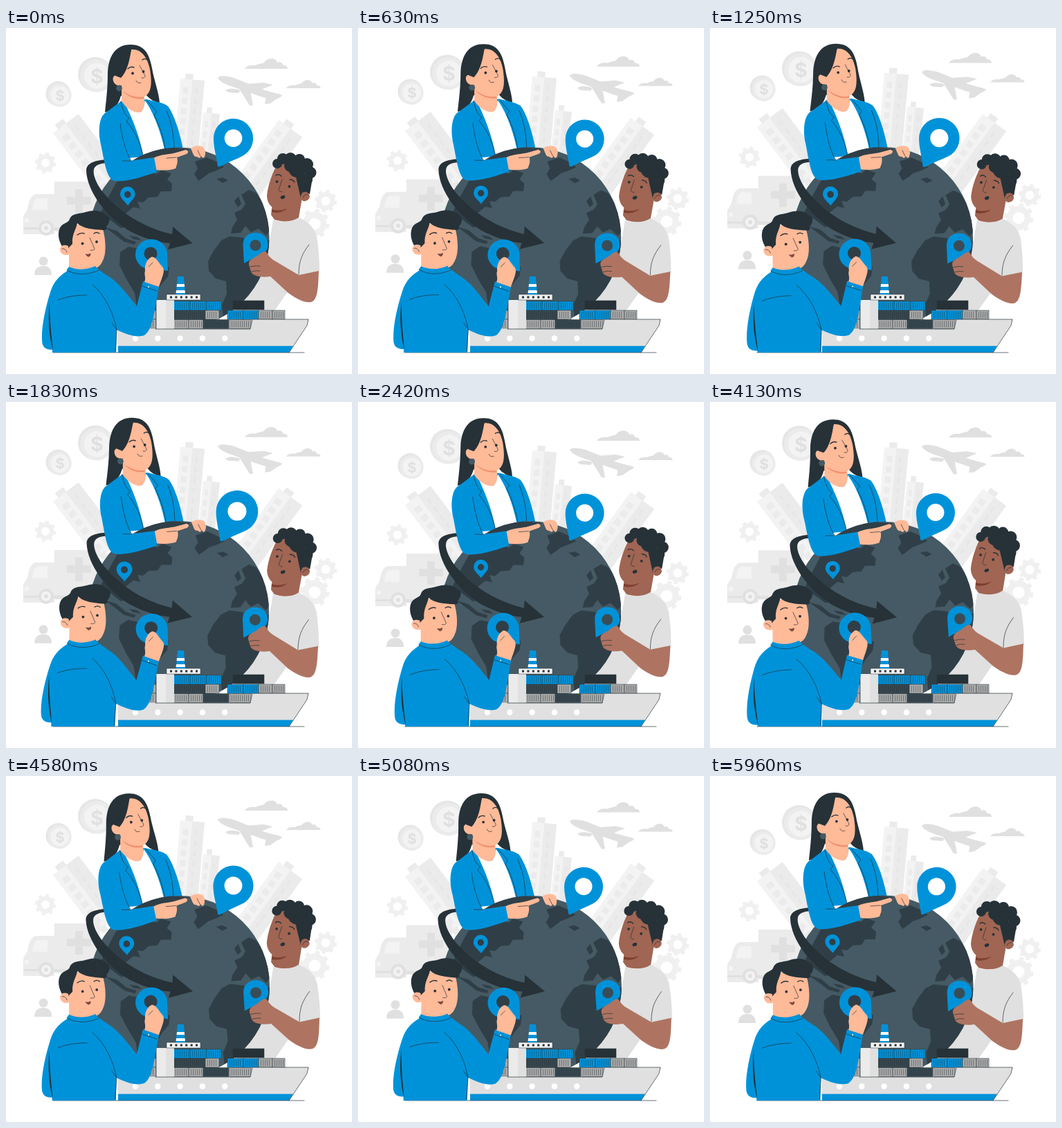
Animation, 500 px wide and 500 px high, one loop 6000 ms. Source, as an HTML page:

```html
<!DOCTYPE html>
<html lang="en">
<head>
<meta charset="utf-8">
<title>Global logistics</title>
<style>
  html, body { margin: 0; width: 100%; height: 100%; overflow: hidden; background: #fff; }
  svg { display: block; width: 100vw; height: 100vh; }
  .blue { fill: #0092d9; }
  .dark { fill: #263238; }
  .land { fill: #303f47; }
  .peach { fill: #ffba98; }
  .brown { fill: #a06553; }
  .tan { fill: #ae7461; }
  .grey { fill: #e0e0e0; }
  .soft { fill: #e6e6e6; }
  .pale { fill: #ebebeb; }
  .mist { fill: #f3f3f3; }
  .ink { fill: none; stroke: #263238; stroke-width: .7; stroke-linecap: round; stroke-linejoin: round; }
  .brow { fill: none; stroke: #263238; stroke-width: 1.4; stroke-linecap: round; }
  .coin { font: bold 30px Inter, sans-serif; text-anchor: middle; fill: #e0e0e0; }
</style>
</head>
<body>
<svg id="stage" viewBox="0 0 500 500"></svg>
<script>
const LOOP = 6000, FPS = 24, TAU = Math.PI * 2;

const path = (cls, d) => `<path class="${cls}" d="${d}"/>`;
const rect = (cls, x, y, w, h) => `<rect class="${cls}" x="${x}" y="${y}" width="${w}" height="${h}"/>`;
const dot = (cls, x, y, r) => `<circle class="${cls}" cx="${x}" cy="${y}" r="${r}"/>`;
const oval = (cls, x, y, rx, ry, turn = 0) =>
  `<ellipse class="${cls}" rx="${rx}" ry="${ry}" transform="translate(${x} ${y}) rotate(${turn})"/>`;
const group = (id, body) => `<g id="${id}">${body}</g>`;
const range = n => [...Array(n).keys()];

// ---- background ----
function coin(x, y, r) {
  return dot('soft', x - 2, y - 2, r) + dot('pale', x, y, r * .95) + dot('mist', x + .5, y, r * .74) +
    `<text class="coin" x="${x + .5}" y="${y + r * .42}" style="font-size:${r * 1.15}px">$</text>`;
}

function gear(x, y, r) {
  const tooth = TAU * r * .9 / 16;
  return `<g fill="none" stroke="#f0f0f0"><circle cx="${x}" cy="${y}" r="${r * .62}" stroke-width="${r * .42}"/>
    <circle cx="${x}" cy="${y}" r="${r * .9}" stroke-width="${r * .24}" stroke-dasharray="${tooth * .9} ${tooth * 1.1}"/></g>`;
}

function tower(x, y, w, h, turn) {
  const rows = range(Math.floor(h / 15)).map(i =>
    rect('soft', w * .66, 12 + i * 15, 3, 8) + rect('pale', w * .14, 12 + i * 15, w * .22, 9)).join('');
  return `<g transform="translate(${x} ${y}) rotate(${turn})">` +
    rect('pale', w * .2, -8, w * .32, 9) + rect('mist', 0, 0, w, h) + rect('pale', w * .5, 0, w * .5, h) +
    rows + '</g>';
}

const cloud = (x, y, s) => `<g transform="translate(${x} ${y}) scale(${s})">` +
  path('grey', 'M0 15 C3 10 9 9 16 10 C20 7 25 8 28 6 C32 -1 45 -2 47 6 C52 4 55 7 55 10 C60 10 62 12 62 15 Z') + '</g>';

const plane =
  path('grey', 'M345 81 L372 79 L386 82 L366 90 Z') +
  path('grey', 'M306 72 C309 68 318 69 329 72 L369 88 C381 93 393 94 399 97 C398 102 384 105 368 99 L322 83 C314 80 308 76 306 72 Z') +
  path('grey', 'M336 86 L353 91 L357 112 L352 112 Z') +
  path('grey', 'M317 90 C323 86 333 88 339 90 L336 94 L321 93 Z') +
  path('grey', 'M376 97 L399 97 L382 109 L374 110 Z');

const truck =
  rect('pale', 70, 222, 66, 68) +
  rect('grey', 100, 233, 11, 34) + rect('grey', 88, 244, 35, 11) +
  path('pale', 'M70 240 L45 240 C36 240 33 251 31 262 L25 272 V298 H70 Z') +
  path('mist', 'M60 246 H46 C41 246 39 254 38 263 H60 Z') +
  rect('grey', 25, 288, 45, 3) + rect('grey', 70, 288, 60, 5) + rect('mist', 27, 275, 6, 6) +
  dot('grey', 58, 289, 11) + dot('mist', 58, 289, 7) + dot('grey', 58, 289, 3);

const scenery =
  coin(131, 69, 25) + coin(77.5, 97, 18) +
  tower(252, 73, 35, 112, 5) + tower(285, 122, 24, 70, 6) +
  tower(68, 152, 46, 105, -37) + tower(394, 133, 42, 115, 36) +
  cloud(345, 44, 1) + cloud(405, 75, .8) + plane + truck +
  gear(57, 195, 15) + gear(446, 283, 21) + gear(462, 250, 16) +
  dot('grey', 54, 337, 6.5) + path('grey', 'M41 357 C41 348 46 344 54 344 C62 344 66 348 66 357 Z');

// ---- globe ----
const globe =
  `<clipPath id="disc"><circle cx="250" cy="303" r="130.5"/></clipPath>
  <circle cx="250" cy="303" r="130.5" fill="#455a64"/><g clip-path="url(#disc)">` +
  path('land', 'M186 190 L205 178 L232 172 L264 175 L262 180 L248 184 L246 190 L235 187 L222 192 L212 188 L196 192 Z') +
  path('land', 'M148 244 L160 222 L178 213 L195 215 L203 207 L218 211 L225 205 L239 210 L233 219 L240 225 L239 236 L224 236 L219 244 L206 245 L198 252 L190 251 L194 261 L184 259 L172 269 L164 278 L176 287 L166 289 L150 277 L133 275 Z') +
  path('land', 'M205 193 L222 190 L224 198 L216 204 L204 202 Z M227 196 L243 192 L248 200 L238 204 Z') +
  path('land', 'M273 193 L290 187 L306 194 L315 201 L304 206 L293 210 L284 217 L278 221 L272 211 L277 203 Z') +
  path('land', 'M304 218 L313 216 L321 220 L313 224 Z') +
  path('land', 'M143 288 L160 293 L173 304 L188 309 L186 313 L171 309 L158 299 Z M178 300 L190 302 L196 307 L184 305 Z') +
  path('land', 'M165 324 L177 316 L192 319 L208 327 L219 337 L236 346 L234 359 L224 371 L214 388 L203 402 L200 418 L190 410 L186 383 L174 363 L164 343 Z') +
  path('land', 'M330 250 L336 243 L340 254 L335 259 Z M327 288 L334 277 L330 267 L341 262 L346 254 L340 241 L351 234 L361 238 L372 252 L385 288 L376 300 L365 290 L354 295 L346 286 L339 296 L325 297 Z') +
  path('land', 'M311 307 L323 301 L342 303 L354 310 L382 306 L380 345 L360 388 L340 409 L314 419 L312 400 L319 384 L318 366 L303 362 L293 351 L292 337 L300 322 Z') +
  '</g>';

const arrow = path('dark',
  'M147 190 C131 191 116 194 116 206 C117 236 145 273 178 293 C201 305 221 310 237 311 L234 320 L269.5 311 L241 287 L240 298 C204 290 169 270 146 244 C132 229 125 213 127 204 C129 197 139 195 148 195 Z');

const pins =
  path('blue', 'M305 200 C303 185 299 174 299 160 A28 28 0 1 1 340 185 C330 190 319 194 308 200 Z') +
  `<circle cx="327" cy="160" r="12.5" fill="#fff"/>` +
  path('blue', 'M178 255 C173 249 167 245 167 239 A10.5 10.5 0 0 1 188 239 C188 245 182 249 178 255 Z') +
  dot('land', 177.5, 239.5, 4.7);

// ---- people ----
const womanBack =
  path('dark', 'M180 24 C157 24 148 42 147 65 C147 91 144 110 143 122 C156 119 163 110 166 98 L202 96 C208 104 216 107 222 108 C221 93 214 76 211 58 C207 36 199 24 180 24 Z') +
  path('blue', 'M166 106 L142 124 L150 190 L200 186 L256 175 C251 150 243 125 234 113 C226 107 214 106 203 103 Z') +
  `<path fill="#fff" d="M171 107 L196 121 L201 105 C212 120 224 149 230 180 L199 188 C193 153 180 126 171 107 Z"/>` +
  path('peach', 'M167 80 V106 C175 118 187 123 194 122 C200 118 201 110 200 104 L200 92 Z') +
  `<path fill="#f28f6e" d="M169 91 C178 98 188 101 199 99 L199 102 C186 104 174 98 169 91 Z"/>` +
  path('peach', 'M181 31 C196 30 205 42 208 60 C211 78 211 94 200 99 C186 103 171 94 167 83 C158 85 153 77 155 71 C158 66 164 69 166 72 C174 64 178 51 181 31 Z') +
  path('dark', 'M182 29 C178 39 177 58 166 72 L158 69 C158 49 164 34 182 29 Z M181 29 C190 29 203 38 207 55 L210 55 C204 33 194 26 181 29 Z') +
  `<circle cx="163.5" cy="87" r="4.4" fill="#455a64"/>` +
  dot('dark', 183, 65.5, 1.9) + dot('dark', 198.5, 63, 1.9) +
  path('brow', 'M176 59 Q180 55 185 57 M197 46 Q201 43 204 46') +
  path('ink', 'M193 54 L201 69 Q201 73 196 72 M188 76 Q190 81 195 79') +
  path('ink', 'M166 106 C169 120 172 126 178 130 L174 135 C186 148 193 164 198 184 M204 105 L218 121 L214 126 C223 142 228 160 231 178 M232 120 C239 136 242 151 243 173');

const womanArms =
  path('peach', 'M213 188 C224 182 236 183 246 180 L260 176 Q266 178 261 182 L247 187 C249 192 247 199 245 203 C237 206 226 206 216 205 Z') +
  path('blue', 'M143 123 C134 130 133 151 137 168 C142 191 145 219 157 221 C175 223 200 214 218 208 L214 187 L180 192 C176 179 173 162 168 139 Z') +
  path('ink', 'M165 138 C168 160 173 180 181 192 M168 192 L181 192 M232 188 L246 187') +
  path('peach', 'M267 174 C271 170 280 169 285 172 Q290 178 287 186 Q285 190 282 185 Q280 190 276 186 Q272 187 270 181 Z') +
  path('ink', 'M277 177 L281 185');

const rightBody =
  path('grey', 'M386 277 C400 282 414 279 423 274 C437 280 446 289 449 301 C452 320 453 335 453 352 L424 357 L375 427 H330 L340 367 L378 326 Z');

const rightMan =
  path('brown', 'M385 253 L383 270 L388 277 C401 281 414 280 423 274 L428 245 Z') +
  `<path fill="#7d3f30" d="M384 262 C394 265 401 263 407 260 C402 266 392 268 384 266 Z"/>` +
  path('brown', 'M394 194 C385 207 378 229 377 243 C378 258 389 265 402 262 C415 259 424 252 428 246 Q436 253 439 244 Q438 235 429 235 L425 205 Z') +
  [[392, 196, 7], [400, 189, 8], [411, 189, 9], [424, 190, 8], [435, 197, 9], [440, 209, 8.5], [434, 219, 9], [421, 203, 13], [411, 199, 9], [433, 231, 7]]
    .map(c => dot('dark', ...c)).join('') +
  path('dark', 'M418 211 L443 216 L439 240 Q433 236 428 238 L426 246 Z') +
  oval('brown', 432, 243.5, 6, 7, 25) + path('ink', 'M429 245 Q432 239 436 241') +
  dot('dark', 391.5, 222, 1.9) + dot('dark', 409.5, 229, 1.9) +
  path('brow', 'M390 213 Q394 210 398 214 M410 219 Q415 219 417 223') +
  path('ink', 'M399 219 L394 234 Q395 237 399 237') +
  oval('dark', 400, 244.5, 3.4, 2.4, -22) +
  path('blue', 'M344 340 L342.5 313 C342.5 290 378.5 290 378.5 313 C379 325 365 331 355 334 Z') +
  `<circle cx="360.5" cy="314" r="8" fill="#3a4d56"/>` +
  path('tan', 'M351 342 C350 335 357 333 362 330 C368 325 374 320 377 325 C379 329 382 332 386 335 L423 357 L452 351 C451 374 451 393 441 396 C432 398 419 391 408 383 L382 359 C371 361 356 359 354 352 Z') +
  path('ink', 'M438 313 C428 326 423 337 423 356 M353 345 Q360 343 367 344 M355 352 Q361 350 367 351');

const leftMan =
  path('blue', 'M234 351 C223 349 206 349 198 346 A23 22 0 1 1 233 326 Z') +
  dot('land', 209, 326, 9.5) +
  path('blue', 'M90 350 C79 357 69 365 64 382 C57 404 51 432 52 451 C52 461 57 465 67 465 V474 H159 L160 436 C174 443 189 448 200 444 C210 437 213 419 216 402 L221 374 L198 366 L189 402 C175 385 163 367 145 357 L131 347 Z') +
  path('dark', 'M63 397 C60 423 63 449 68 466 C66 449 63 423 63 397 Z') +
  path('peach', 'M91 321 L91 350 C101 356 118 354 130 347 L120 338 Z') +
  path('peach', 'M97 286 C110 281 130 284 140 290 C144 306 146 326 139 338 C133 351 118 350 108 344 C100 340 96 334 92 327 Q81 331 78 321 Q79 313 89 314 Z') +
  path('dark', 'M82 317 C75 307 74 294 79 287 C84 281 90 282 92 276 C96 267 106 269 115 266 C127 262 139 264 144 270 C151 272 151 281 145 287 C147 290 144 293 140 292 C126 291 111 290 103 282 C101 292 95 298 96 312 L90 318 Z') +
  path('peach', 'M90 315 Q81 311 78 319 Q79 329 90 328 Z') +
  path('ink', 'M81 319 Q86 318 88 324') +
  dot('dark', 110.5, 311.5, 1.9) + dot('dark', 131, 309, 1.9) +
  path('brow', 'M103 299 Q108 295 113 297 M127 297 Q131 294 135 297') +
  path('ink', 'M121 303 L128 319 Q127 322 122 321') +
  `<path fill="#9f4538" stroke="#263238" stroke-width=".6" d="M115 327 Q119 328 122 326 Q122 331 118 330 Z"/>` +
  path('blue', 'M88 349 L91 345 C102 350 116 350 129 344 L134 350 C120 357 102 359 90 355 Z') +
  path('ink', 'M88 350 C102 358 119 357 134 350 M75 393 C91 387 105 386 117 386 M125 371 C143 386 155 411 160 436 L158 467 M197 373 L218 380 M160 436 L153 426') +
  path('peach', 'M201 351 C200 342 204 334 210 331 C216 329 220 339 226 345 C231 350 225 362 221 374 L200 367 C203 361 199 356 201 351 Z') +
  path('ink', 'M206 345 L212 339') +
  `<circle cx="206" cy="374" r="1" fill="#fff"/>`;

// ---- ship ----
const paint = { b: '#0092d9', d: '#37474f', k: '#263238', g: '#a9a9a9' };

function box(x, y, w, tone) {
  return `<rect x="${x}" y="${y}" width="${w}" height="13" fill="${paint[tone]}" stroke="#263238" stroke-width=".5"/>
    <path d="M${x + 3} ${y + 6.5}H${x + w - 2}" stroke="#263238" stroke-opacity=".5" stroke-width="9" stroke-dasharray=".9 2.1"/>`;
}

const cargo = [
  [203, 408, 14, 'g'], [203, 421, 14, 'g'],
  [242, 395, 24, 'b'], [266, 395, 24, 'b'], [290, 395, 21, 'b'],
  [242, 408, 46, 'd'], [288, 408, 20, 'g'],
  [242, 421.5, 22, 'g'], [264, 421.5, 21, 'g'], [285, 421.5, 37, 'd'],
  [328, 394, 45, 'k'], [320, 408, 23, 'b'], [343, 408, 22, 'b'],
  [365, 408, 20, 'g'], [385, 408, 18, 'g'], [323, 421.5, 31, 'g']
];

const ship =
  cargo.map(c => box(...c)).join('') +
  rect('pale', 217, 393, 26, 43) + rect('grey', 231, 393, 12, 43) + path('ink', 'M217 393 V435') +
  path('grey', 'M161 435 H353 L356 421 H437 L435 430 L414 461 H162 Z') +
  path('blue', 'M162 459.5 H415 L409 469 H162 Z') +
  path('ink', 'M216 435 H353 L356 421 H437 L435 430 L409 469') +
  range(5).map(i => `<circle cx="${187 + i * 32.3}" cy="448.5" r="4.2" fill="#fff"/>`).join('') +
  `<rect x="232" y="385" width="49" height="8" fill="#f1f1f1" stroke="#263238" stroke-width=".5"/>
  <path d="M237 389H278" stroke="#263238" stroke-width="3" stroke-dasharray="3 4.4"/>` +
  path('blue', 'M248 359 H257 L259 385 H245.5 Z') +
  `<path fill="#fff" d="M247 370 H257.8 L258.2 374 H246.6 Z M246 379 H258.6 L258.9 383 H245.6 Z"/>` +
  path('ink', 'M68 469 H431');

document.getElementById('stage').innerHTML =
  group('scenery', scenery) +
  group('world', womanBack + rightBody + globe + arrow + group('pins', pins) + womanArms + rightMan) +
  ship +
  `<clipPath id="floor"><rect width="500" height="469"/></clipPath>
  <g clip-path="url(#floor)">${group('worker', leftMan)}</g>`;

// ---- motion ----
const beats = [[0, .22], [.14, 1], [.18, .93], [.32, 0], [.75, 0], [.85, .55], [.96, 0], [1, .22]];

function beat(p) {
  const i = beats.findIndex(b => b[0] > p);
  const [p0, v0] = beats[i - 1], [p1, v1] = beats[i];
  return v0 + (v1 - v0) * (p - p0) / (p1 - p0);
}

const move = (id, value) => document.getElementById(id).setAttribute('transform', value);

function draw(now) {
  const t = Math.floor((now % LOOP) * FPS / 1000) * 1000 / FPS;
  const scale = 1 + .1 * beat(t % 1500 / 1500);
  move('scenery', `translate(0 ${-4.5 * (1 - Math.cos(TAU * t / 3000))})`);
  move('world', `rotate(${.65 * Math.sin(TAU * t / LOOP)} 290 260)`);
  move('pins', `translate(257 190) scale(${scale}) translate(-257 -190)`);
  move('worker', `rotate(${Math.sin(TAU * t / 1500)} 170 365)`);
}

const start = performance.now();
function tick() {
  draw(performance.now() - start);
  requestAnimationFrame(tick);
}
tick();
</script>
</body>
</html>
```
